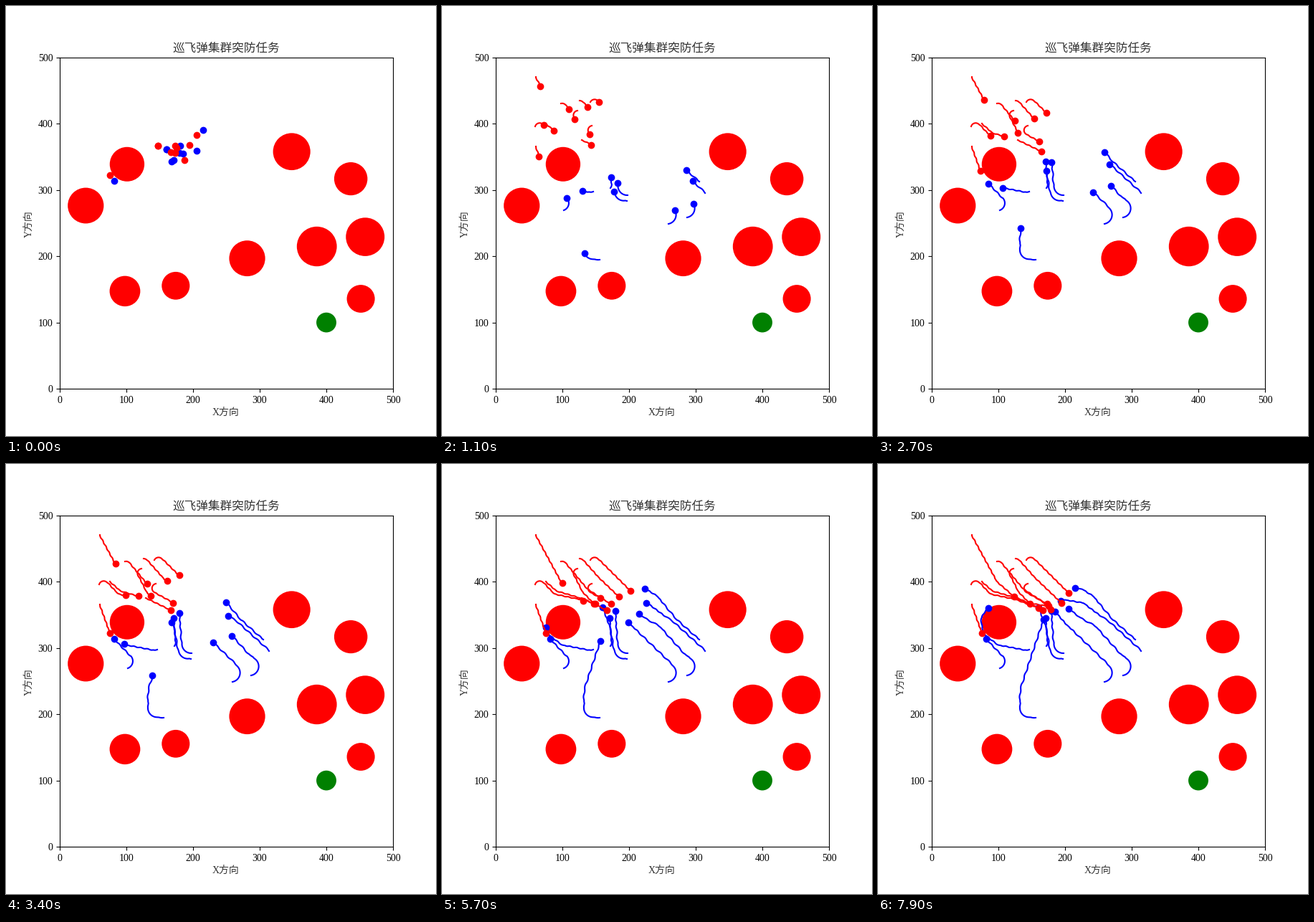
These frames come from a looping animation (600x600 px, 8000 ms). A matplotlib script:

```python
import math

import matplotlib.pyplot as plt
from matplotlib.animation import FuncAnimation
from matplotlib.patches import Circle

plt.rcParams["font.family"] = ["Liberation Serif", "Noto Sans CJK JP"]

FRAMES, INTERVAL = 80, 100
INK = "#333333"

fig = plt.figure(figsize=(6, 6), dpi=100, facecolor="white")
ax = fig.add_axes([0.125, 0.11, 0.775, 0.77])
ax.set(xlim=(0, 500), ylim=(0, 500))
ax.set_xticks(range(0, 501, 100))
ax.set_yticks(range(0, 501, 100))
ax.set_title("巡飞弹集群突防任务", fontsize=12, color=INK)
fig.text(307 / 600, 1 - 567 / 600, "X方向", ha="center", va="center", color=INK)
fig.text(32 / 600, 1 - 304 / 600, "Y方向", ha="center", va="center",
         rotation=90, color=INK)


def to_data(x, y):
    """Stage pixels (y down) to axes data."""
    return (x - 75) / 465 * 500, (534 - y) / 462 * 500


def fly(pos, heading, route, speed, slow, turn):
    """Steer with a limited turn rate along the route and wait at its end."""
    (x, y), h = pos, math.radians(heading)
    route = list(route)
    path = [pos]
    for k in range(1, FRAMES):
        v = speed if k <= slow else min(speed, 1.4)
        if len(route) > 1 and math.dist((x, y), route[0]) < 4:
            route.pop(0)
        gx, gy = route[0]
        gap = math.hypot(gx - x, gy - y)
        if gap <= v:
            x, y = gx, gy
        else:
            aim = math.atan2(gy - y, gx - x)
            error = math.remainder(aim - h, math.tau)
            sway = 0.0
            if gap < 8:
                h = aim
            elif abs(error) > turn:
                h += math.copysign(turn, error)
            else:
                h = aim
                sway = 0.28 * math.sin(math.tau * k / 7)
            x += v * math.cos(h + sway)
            y += v * math.sin(h + sway)
        path.append((x, y))
    return path


class Drone:
    def __init__(self, color, pos, heading, *route, speed, slow=FRAMES, turn):
        path = fly(pos, heading, route, speed, slow, turn)
        self.path = [to_data(*p) for p in path]
        self.goal = to_data(*route[-1])
        self.trail, = ax.plot([], [], color=color, lw=1.5)
        self.dot, = ax.plot([], [], "o", color=color, ms=6)

    def show(self, k):
        """The loop opens on the finished state, then every flight restarts."""
        trail = self.path[:k + 1] if k else []
        x, y = self.path[k] if k else self.goal
        self.trail.set_data([p[0] for p in trail], [p[1] for p in trail])
        self.dot.set_data([x], [y])


drones = []


def blue(*args, speed=2.25, **kw):
    drones.append(Drone("blue", *args, speed=speed, turn=0.175, **kw))


def red(*args):
    drones.append(Drone("red", *args, speed=1.37, turn=0.21))


def disc(x, y, r, color="red"):
    ax.add_patch(Circle((x, y), r, color=color, lw=0))


disc(39, 276.5, 27)
disc(101, 339, 26)
disc(348, 358, 28)
disc(436.7, 317, 25)
disc(385.7, 214.8, 30)
disc(458.3, 229.3, 29)
disc(281.2, 196.8, 27)
disc(174, 155.5, 21)
disc(97.8, 147.3, 23)
disc(451.7, 135.8, 21)
disc(400, 100, 15, "green")

# start, heading in degrees (clockwise from right), then the points to pass
blue((170, 285), -15, (151, 244.5), speed=1.85)
blue((211, 259), 150, (165, 252), (147, 237), (143, 217), (152, 201), (224, 200),
     speed=1.4)
blue((220, 354), 165, (206, 353), (197.5, 328), (199, 310), (231, 217))
blue((235, 254), -45, (234, 215), speed=1.4)
blue((259, 264), 172, (242, 205), slow=20)
blue((258, 272), 178, (250, 272), (234, 224), (224, 200), slow=20)
blue((359, 245), 205, (323, 213), (298, 182), (282, 173), (275, 173), slow=32)
blue((367, 261), 225, (316, 214), (285, 193), (258, 189), (243, 195), slow=34)
blue((316, 304), -5, (262, 223), (247, 206), slow=44)
blue((342, 295), -5, (338, 265), (303, 226), (279, 213), (266, 202), slow=57)

red((131, 99), 95, (167, 166), (190, 185), (212, 195))
red((166, 136), -20, (204, 176), (238, 198))
red((192, 132), -5, (222, 162), (256, 194))
red((207, 134), -70, (266, 180))
red((189, 146), 178, (197, 180), (212, 195))
red((130, 168), -80, (157, 182), (192, 189), (221, 200), (236, 205))
red((145, 164), 60, (163, 180), (196, 188), (212, 195), (240, 199), (249, 215))
red((209, 167), 175, (236, 195))
red((195, 187), 10, (230, 204))
red((131, 196), 60, (145, 236))


def draw(k):
    for d in drones:
        d.show(k)
    return []


ani = FuncAnimation(fig, draw, frames=FRAMES, interval=INTERVAL, repeat=True,
                    repeat_delay=0, init_func=lambda: draw(0), blit=False)
plt.show()
```
